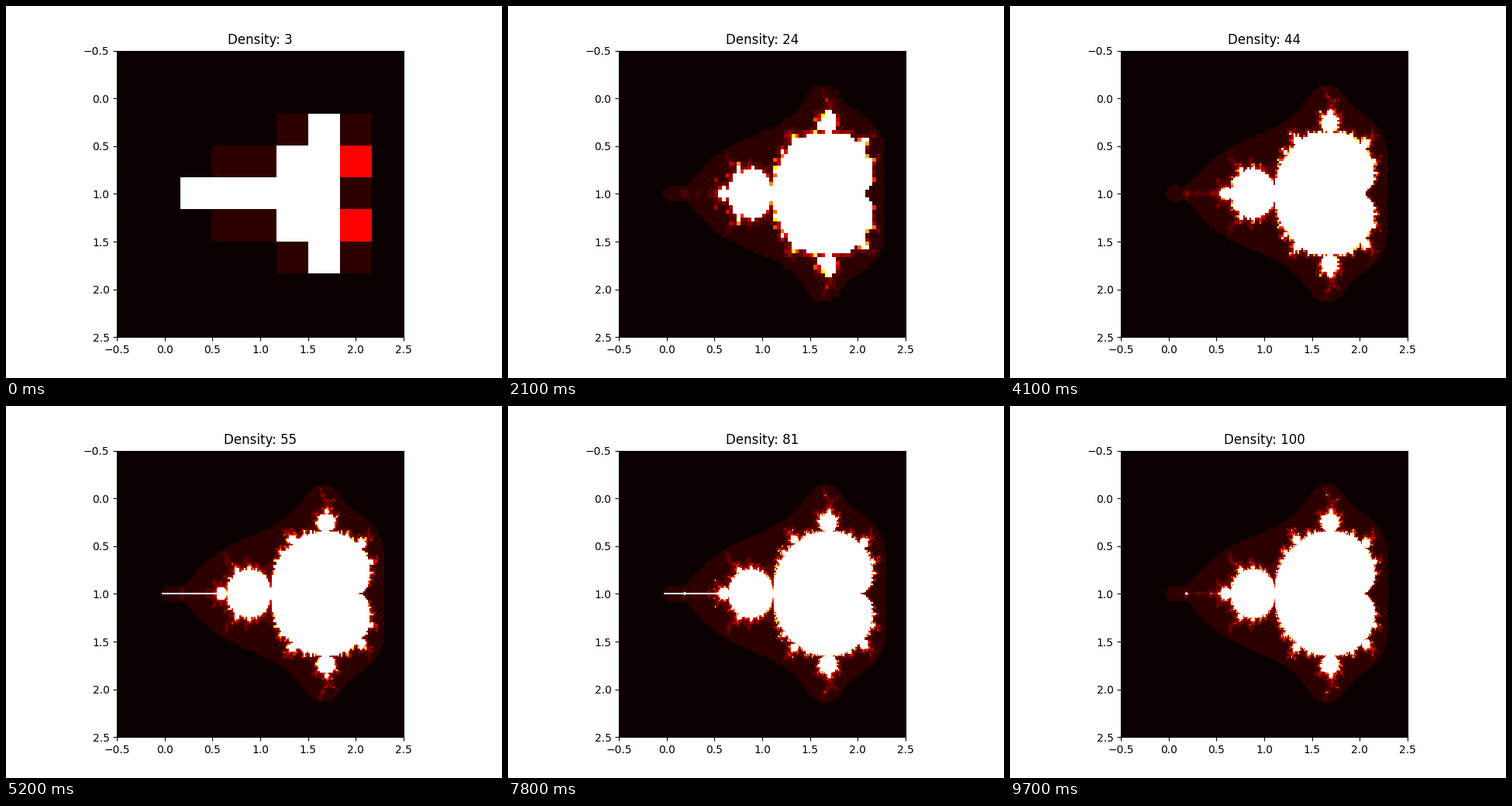
These frames come from a looping animation (640x480 px, 9.8 s). A matplotlib script:

```python
import numpy as np
import matplotlib.pyplot as plt
from matplotlib.animation import FuncAnimation

X_MIN, X_MAX = -2.5, 0.75
Y_MIN, Y_MAX = -1.5, 1.5
FIRST, LAST = 3, 100
MAX_ITER = 100


def complex_grid(density):
    re = np.linspace(X_MIN, X_MAX, int((X_MAX - X_MIN) * density))
    im = np.linspace(Y_MIN, Y_MAX, int((Y_MAX - Y_MIN) * density))
    return re[np.newaxis, :] + im[:, np.newaxis] * 1j


def escape_counts(grid):
    """Number of steps until |z| exceeds 2, capped at MAX_ITER."""
    c = grid.ravel()
    counts = np.full(c.size, MAX_ITER)
    active = np.arange(c.size)
    z = np.zeros_like(c)
    for step in range(1, MAX_ITER):
        z = z * z + c
        inside = z.real ** 2 + z.imag ** 2 <= 4
        counts[active[~inside]] = step
        active, z, c = active[inside], z[inside], c[inside]
    return counts.reshape(grid.shape)


fig, ax = plt.subplots(figsize=(6.4, 4.8), dpi=100)
image = ax.imshow(
    escape_counts(complex_grid(FIRST)),
    cmap=plt.get_cmap("hot", 20),
    vmin=0,
    vmax=MAX_ITER,
    extent=(-0.5, 2.5, 2.5, -0.5),
    interpolation="nearest",
)
title = ax.set_title(f"Density: {FIRST}")


def update(frame):
    density = FIRST + frame
    image.set_data(escape_counts(complex_grid(density)))
    title.set_text(f"Density: {density}")
    return image, title


anim = FuncAnimation(fig, update, frames=LAST - FIRST + 1, interval=100,
                     repeat=True, repeat_delay=0)
plt.show()
```
